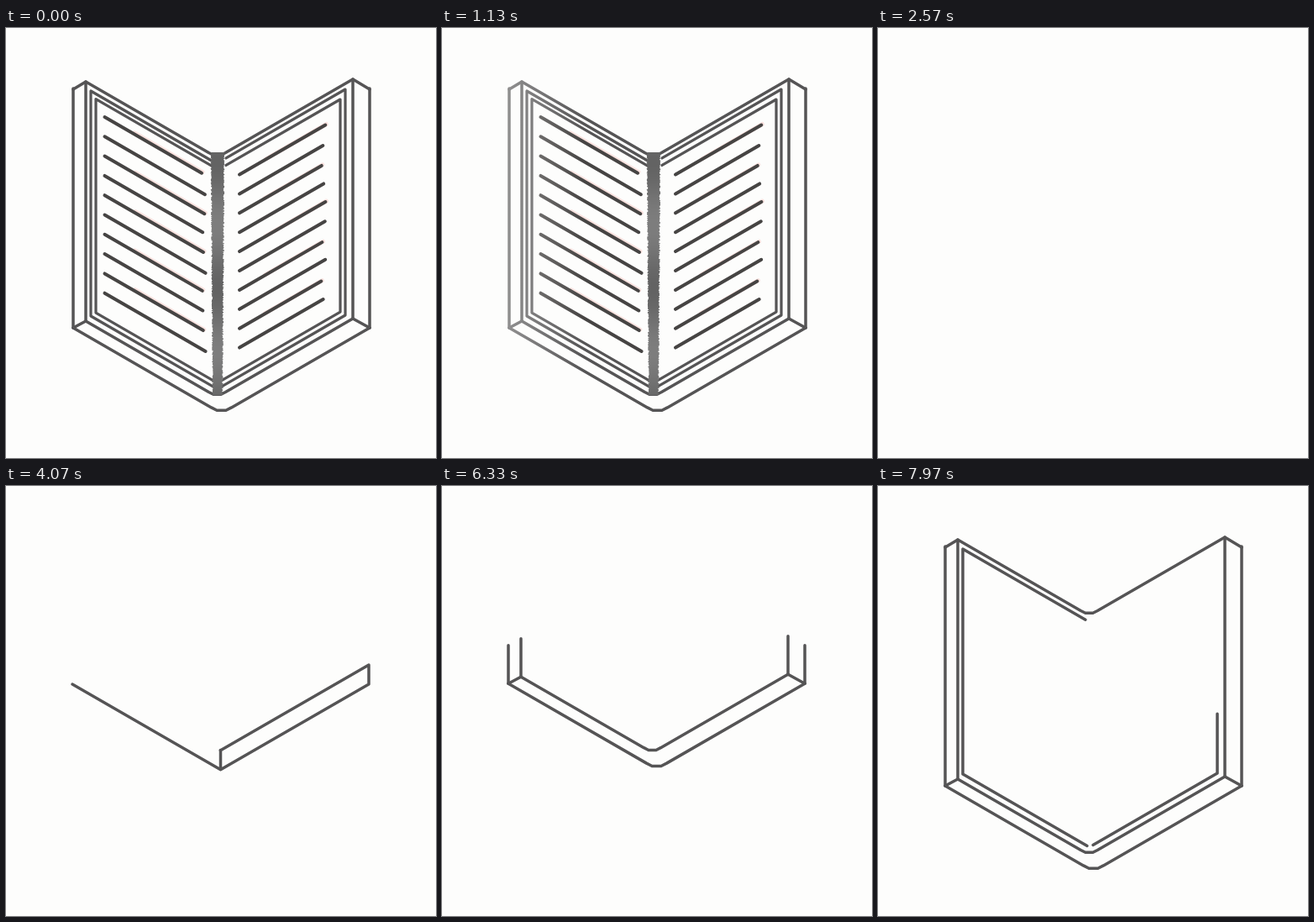
These frames come from a looping animation (512x512 px, 8 s). An HTML page with a canvas:

```html
<!DOCTYPE html>
<html lang="en">
<head>
<meta charset="utf-8">
<title>Sketched book</title>
<style>
  html, body { margin: 0; height: 100%; overflow: hidden; background: #fdfdfc; }
  canvas { display: block; width: 100vw; height: 100vh; }
</style>
</head>
<body>
<canvas id="stage" width="512" height="512"></canvas>
<script>
const ctx = document.getElementById('stage').getContext('2d');
const LOOP = 8000, PAPER = '253,253,252', INK = '#555455';
const SLOPE = 0.577, WALL = 285;

const part = (t, a, b) => Math.min(1, Math.max(0, (t - a) / (b - a)));
const ease = p => p < 0.5 ? 4 * p ** 3 : 1 - (2 - 2 * p) ** 3 / 2;

function random(seed) {
  return () => (seed = seed * 16807 % 2147483647) / 2147483647;
}

// V between two end points, given as [x, y] pairs; r rounds off its tip.
function vee(x0, y0, x1, y1, r = 0) {
  const x = (x0 + x1) / 2 + (y1 - y0) / (2 * SLOPE);
  const y = y0 + SLOPE * (x - x0);
  const tip = [-1, -0.45, 0.45, 1].map(s => [x + s * r, y - r * (Math.abs(s) < 1 ? 0.3 : SLOPE)]);
  return [[x0, y0], ...tip, [x1, y1]];
}

// Three-sided page outline, open towards the spine.
function page(x, top, bottom, spineTop, spineBottom) {
  return [
    [spineTop, top + SLOPE * Math.abs(spineTop - x)], [x, top],
    [x, bottom], [spineBottom, bottom + SLOPE * Math.abs(spineBottom - x)]
  ];
}
const pages = inset => [
  page(101 + inset, 75 + 1.6 * inset, 343 - 0.65 * inset, 247, 249),
  page(404 - inset, 73 + 2 * inset, 342 - 0.65 * inset, 262, 256).reverse()
];

const shift = (pts, dx, dy) => pts.map(([x, y]) => [x + dx, y + dy]);
const mix = (a, b, u) => a.map(([x, y], i) => [x + (b[i][0] - x) * u, y + (b[i][1] - y) * u]);

const LOWER = vee(80, 357, 433, 357, 12);
const UPPER = vee(95, 349, 413, 346, 10);
const TOP = [[80, 73], ...shift(UPPER, 0, -WALL), [433, 73]];
const FLAT_LOWER = vee(79, 236, 432, 236);
const FLAT_UPPER = vee(79, 213, 432, 213);

// Zigzag down the spine, tighter at both ends.
const SCRIBBLE = (() => {
  const rnd = random(11), pts = [];
  for (let i = 0; i < 34; i++) {
    const p = i / 33, side = i % 2 ? 1 : -1;
    pts.push([258 - 6 * p + side * (2 + 3 * rnd()),
      160 + 262 * (p - 0.13 * Math.sin(2 * Math.PI * p)) - side * 4]);
  }
  return pts;
})();

function lengthOf(pts) {
  let sum = 0;
  for (let i = 1; i < pts.length; i++)
    sum += Math.hypot(pts[i][0] - pts[i - 1][0], pts[i][1] - pts[i - 1][1]);
  return sum;
}

// Strokes the stretch of a polyline between the shares `from` and `to`.
function stroke(pts, to = 1, from = 0, width = 3.5, color = INK) {
  if (to <= from) return;
  const len = lengthOf(pts);
  ctx.beginPath();
  pts.forEach(p => ctx.lineTo(...p));
  ctx.setLineDash(to - from < 1 ? [(to - from) * len, 9999] : []);
  ctx.lineDashOffset = -from * len;
  ctx.lineWidth = width;
  ctx.strokeStyle = color;
  ctx.stroke();
}

function drawBase(lower, upper) {
  stroke(lower);
  stroke(upper);
  stroke([lower[0], upper[0]]);
  stroke([lower.at(-1), upper.at(-1)]);
}

function drawCover(height, dx, dy) {
  const lower = shift(LOWER, dx, dy), upper = shift(UPPER, dx, dy);
  drawBase(lower, upper);
  if (height > 0)
    for (const [x, y] of [lower[0], upper[0], upper.at(-1), lower.at(-1)])
      stroke([[x, y], [x, y - WALL * height]]);
}

function drawText() {
  const rnd = random(5);
  const row = (x, y, end, slope, glow) => {
    const line = [[x, y], [end, y + (end - x) * slope]];
    if (glow) stroke(shift(line, 1, -1), 1, 0.3, 5, 'rgba(240,165,160,.3)');
    stroke(line, 1, 0, 4, '#464443');
  };
  for (let i = 0; i < 10; i++) {
    row(117.5, 106 + 23.3 * i, 233 + 5 * rnd(), SLOPE, i % 2 === 0);
    row(278, 174.5 + 22.9 * i, 375 + 8 * rnd(), -SLOPE, i % 2 === 0);
  }
}

function drawSpine() {
  const rnd = random(7);
  for (let y = 148; y < 437; y++) {
    const p = (y - 148) / 289, half = 7 - 2 * p;
    const grey = 112 + 13 * Math.sin(12 * p - 2);
    const left = 252 - half - rnd() * 1.5, right = 252 + half + rnd() * 1.5;
    ctx.fillStyle = `rgb(${grey},${grey},${grey})`;
    ctx.fillRect(left, y, right - left, 1.2);
  }
}

function drawBook(t) {
  drawCover(1, 0, 0);
  stroke(TOP);
  [...pages(0), ...pages(6)].forEach(p => stroke(p, 1, 0, 3.2));
  drawText();
  drawSpine();
  // Soft wipe to paper from the left
  const edge = -260 + 700 * part(t, 870, 1330) ** 2.5;
  const wipe = ctx.createLinearGradient(edge, 0, edge + 260, 0);
  wipe.addColorStop(0, `rgba(${PAPER},1)`);
  wipe.addColorStop(1, `rgba(${PAPER},0)`);
  ctx.fillStyle = wipe;
  ctx.fillRect(0, 0, 512, 512);
}

function drawFoot(t) {
  const [left, tip, right] = [FLAT_LOWER[0], FLAT_LOWER[1], FLAT_LOWER.at(-1)];
  const [upLeft, upTip, upRight] = shift([left, tip, right], 0, -23);
  if (t < 4930) {
    stroke([left, tip, right, upRight, upTip, tip], part(t, 3240, 4070));
    stroke([upTip, upLeft, left], part(t, 4070, 4900));
    return;
  }
  const u = ease(part(t, 4900, 5730));
  drawBase(mix(FLAT_LOWER, shift(LOWER, -1, -121.8), u),
    mix(FLAT_UPPER, shift(UPPER, -1, -121.8), u));
  stroke([tip, upTip], 1 - u);
}

function drawRise(t) {
  const high = 1 - ease(part(t, 6330, 6570));
  drawCover(ease(part(t, 6207, 6570)), -high, -121.8 * high);
  stroke(TOP, ease(part(t, 6580, 7050)));
  stroke(SCRIBBLE, part(t, 7000, 7420), part(t, 7440, 7700), 2);
  const drawn = 2 * part(t, 7530, 8160);
  pages(0).forEach((p, i) => stroke(p, Math.min(1, drawn - i)));
}

function draw(t) {
  ctx.fillStyle = `rgb(${PAPER})`;
  ctx.fillRect(0, 0, 512, 512);
  ctx.lineCap = ctx.lineJoin = 'round';
  if (t < 1330) drawBook(t);
  else if (t >= 5770) drawRise(t);
  else if (t >= 3270) drawFoot(t);
}

function tick(now) {
  draw(now % LOOP);
  requestAnimationFrame(tick);
}
draw(0);
requestAnimationFrame(tick);
</script>
</body>
</html>
```
